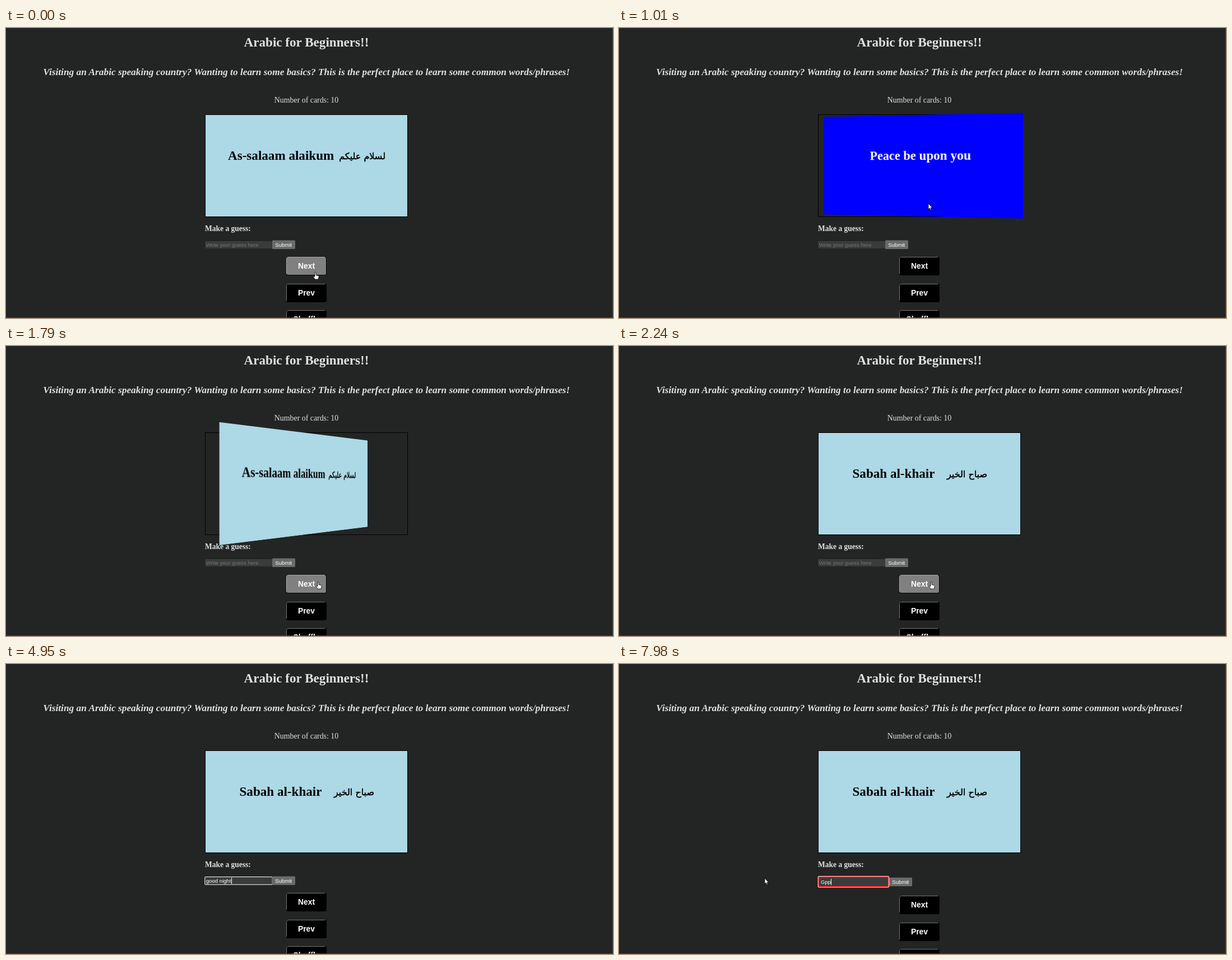
An HTML page for the animation above (8 s loop, 1083 by 517 pixels).

```html
<!DOCTYPE html>
<html lang="en">
<head>
<meta charset="utf-8">
<title>Arabic for Beginners</title>
<style>
  html, body { margin: 0; width: 1083px; height: 517px; overflow: hidden; background: #232524; }
  svg { position: absolute; left: 0; top: 0; }
  text { font-family: "Liberation Serif", "Times New Roman", serif; white-space: pre; }
  .bold { font-weight: bold; }
  .mid { text-anchor: middle; }
  .ui text { font: 9.63px "Liberation Sans", Arial, sans-serif; fill: #fff; }
  .ui .btn text { font-size: 13.86px; font-weight: bold; text-anchor: middle; }
  .btn path { fill: none; stroke: #767676; }
  .btn.hover .face { fill: #808080; }
  .btn.hover path { stroke: #a8a8a8; }
  .frame { position: absolute; left: 355px; top: 154px; width: 360px; height: 181px; border: 1px solid #000; perspective: 722px; }
  .card { width: 360px; height: 181px; transform-style: preserve-3d; }
  .side { position: absolute; inset: 0; backface-visibility: hidden; background: #add8e6; }
  .back { background: #00f; transform: rotateY(180deg); }
  .side text { font-size: 23.1px; font-weight: bold; }
  .side .ar { font: 16px "DejaVu Sans", sans-serif; text-anchor: end; stroke: #000; stroke-width: .5px; }
</style>
</head>
<body>
<svg width="1083" height="517" fill="#e0e0e0">
  <text class="bold mid" x="536" y="33" font-size="23.1">Arabic for Beginners!!</text>
  <text class="bold mid" x="536.2" y="83.5" font-size="17.33" font-style="italic">Visiting an Arabic speaking country? Wanting to learn some basics? This is the perfect place to learn some common words/phrases!</text>
  <text class="mid" x="536" y="132.5" font-size="13.86">Number of cards: 10</text>
  <text class="bold" x="355" y="361.8" font-size="13.52">Make a guess:</text>
  <g class="ui">
    <rect id="outline" fill="#fff"/>
    <rect id="border" fill="#f00"/>
    <rect id="field" fill="#3b3b3b"/>
    <rect id="selection" fill="#3390ff" height="12"/>
    <text id="guess"></text>
    <rect id="caret" width="1" height="11" fill="#fff"/>
    <g id="submit">
      <rect x="475" y="378.5" width="41" height="15.5" rx="1.5"/>
      <text x="480.3" y="389.5">Submit</text>
    </g>
    <g id="buttons"></g>
  </g>
  <path d="M0 516.5H1082.5V0" fill="none" stroke="#444645"/>
</svg>

<div class="frame"><div class="card" id="card">
  <div class="side"><svg width="360" height="181">
    <g id="hello"><text x="40" y="80">As-salaam alaikum</text><text class="ar" x="321" y="79">لسلام عليكم</text></g>
    <g id="morning"><text x="60.5" y="80">Sabah al-khair</text><text class="ar" x="301" y="79">صباح الخير</text></g>
  </svg></div>
  <div class="side back"><svg width="360" height="181"><text class="mid" x="180" y="80" fill="#fff">Peace be upon you</text></svg></div>
</div></div>

<svg width="1083" height="517"><g id="cursor" stroke="#000" stroke-width=".8" fill="#fff">
  <path id="arrow" d="M0 0V10L2.3 8 3.7 11.4 5.4 10.7 4 7.4H7Z"/>
  <path id="hand" d="M-1 0Q0-1.4 1.1 0V4.6L5.4 5.5Q6.4 6 6.2 7.5L5.2 12H-.8L-3.6 7.6Q-3.4 6-1 7.4Z"/>
  <path id="beam" fill="none" stroke="#bbb" d="M-2-5H2M0-5V5M-2 5H2"/>
</g></svg>

<script>
const $ = id => document.getElementById(id);
const show = (id, on) => $(id).style.display = on ? '' : 'none';
const set = (id, attrs) => { for (const k in attrs) $(id).setAttribute(k, attrs[k]); };
const box = (id, x, y, width, height, rx) => set(id, { x, y, width, height, rx });
const clamp = v => Math.min(1, Math.max(0, v));
const within = (t, from, to) => t >= from && t < to;

const LOOP = 8000, FLIP = 765;
const at = { enter: 462, leave: 1444, nextCard: 1940, focus: 3340, type: 4050, typed: 4950, aim: 5350,
  submit: 6130, error: 6280, refocus: 6830, retype: 7560 };
// pointer moves: begin, end, then the point reached
const moves = [[at.error, at.error, 552, 436], [440, 600, 552, 313], [1340, 1550, 557, 412], [1550, 1790, 557, 421],
  [2700, at.focus, 415, 386], [at.aim, 6000, 497, 387], [6450, at.refocus, 410, 390], [at.refocus, 7250, 260, 382]];

$('buttons').innerHTML = ['Next', 'Prev', 'Shuffle'].map((label, i) =>
  `<g class="btn" transform="translate(500 ${Math.round(408 + i * 47.5)})">
    <rect width="72" height="33" rx="3"  fill="#000"/>
    <rect class="face" x=".7" y=".7" width="70.3" height="31.3" rx="2.5" fill="#000"/>
    <path d="M.5 30V3.5Q.5.5 3.5.5H69"/><text x="36" y="21.2">${label}</text></g>`).join('');
const next = document.querySelector('.btn');

// cubic-bezier(.25, .1, .25, 1)
function ease(p) {
  p = clamp(p);
  const curve = (a, b, s) => 3 * (1 - s) * s * ((1 - s) * a + s * b) + s ** 3;
  let lo = 0, hi = 1;
  for (let i = 0; i < 24; i++) {
    const m = (lo + hi) / 2;
    if (curve(.25, .25, m) < p) lo = m; else hi = m;
  }
  return curve(.1, 1, lo);
}

function pointer(t) {
  let [, , x, y] = moves[0];
  for (const [from, to, px, py] of moves.slice(1)) {
    const p = clamp((t - from) / (to - from)), k = p * p * (3 - 2 * p);
    x += (px - x) * k;
    y += (py - y) * k;
  }
  return [x, y];
}

function typedText(t) {
  if (t >= at.retype) return 'Gpp'.slice(0, 1 + (t >= 7830) + (t >= 7980));
  if (t < at.type) return '';
  return 'good night'.slice(0, 1 + Math.floor(9 * clamp((t - at.type) / (at.typed - at.type))));
}

function drawField(t, x) {
  const wrong = t >= at.error;
  const focus = within(t, at.focus, at.submit) || t >= at.refocus;
  show('outline', focus);
  show('border', wrong);
  if (wrong) {
    box('outline', 354.8, 378, 127.2, 20.5, 2);
    box('border', 355.8, 379, 125.2, 18.5, 1);
    box('field', 358, 381.2, 120.8, 14.1, 0);
  } else {
    box('outline', 354.3, 379, 121.5, 14.8, 2);
    box('field', 355.3, 380, 119.5, 12.8, 1);
  }
  const left = wrong ? 360 : 356.7, value = typedText(t), guess = $('guess');
  guess.textContent = value || 'Write your guess here';
  guess.style.fill = value ? '#fff' : '#757575';
  set('guess', { x: left, y: wrong ? 391.5 : 389.5 });

  const end = left + (value ? guess.getComputedTextLength() : 0);
  const selecting = within(t, at.refocus + 100, at.retype);
  const from = Math.max(left, x);
  show('selection', selecting);
  set('selection', { x: from, y: 382.5, width: Math.max(0, end - from) });
  show('caret', focus && !selecting && !within(t, 3770, at.type));
  set('caret', { x: Math.round(end), y: wrong ? 383 : 381 });
}

function draw(t) {
  const [x, y] = pointer(t);
  const over = (left, top, right, bottom) => within(x, left, right) && within(y, top, bottom);
  const turn = ease((t - at.enter) / FLIP) - ease((t - at.leave) / FLIP);
  $('card').style.transform = `rotateY(${180 * turn}deg)`;
  show('hello', t < at.nextCard);
  show('morning', t >= at.nextCard);

  drawField(t, x);
  const wrong = t >= at.error;
  set('submit', { transform: wrong ? 'translate(7 2.2)' : '', fill: over(475, 378, 517, 396) ? '#5c5c5c' : '#6b6b6b' });
  set('buttons', { transform: wrong ? 'translate(0 5)' : '' });

  const onNext = over(500, 408, 572, 441), onField = over(355, 379, 475, 395);
  next.classList.toggle('hover', onNext);
  show('hand', onNext);
  show('beam', onField);
  show('arrow', !onNext && !onField);
  show('cursor', !within(t, at.type, at.aim));
  set('cursor', { transform: `translate(${x} ${y})` });
}

const start = performance.now();
function tick(now) {
  draw(Math.max(0, now - start) % LOOP);
  requestAnimationFrame(tick);
}
tick(start);
</script>
</body>
</html>
```
